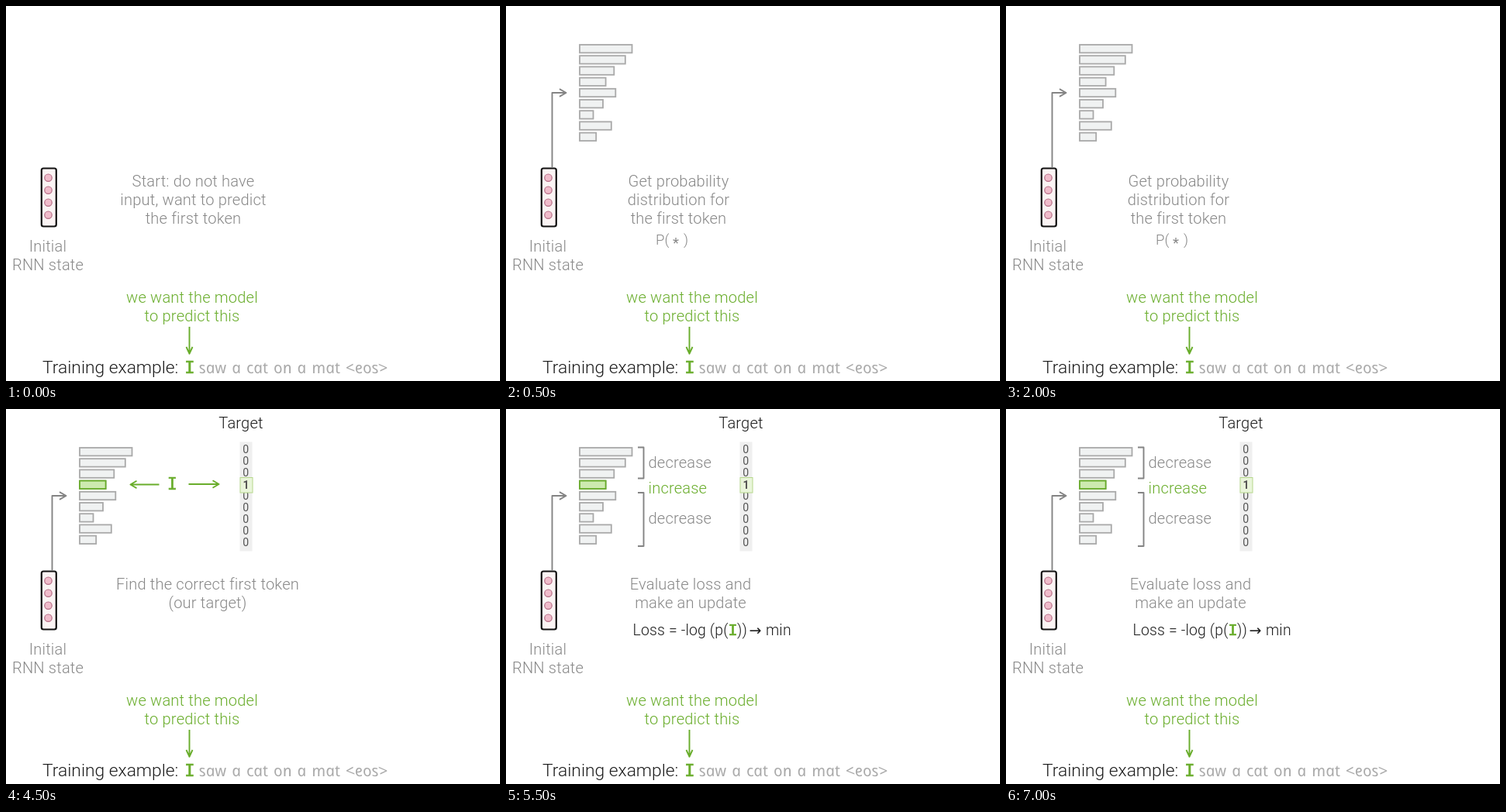
Animation of 637 by 484 pixels, one loop 8000 ms. Source, as an HTML page:

```html
<!DOCTYPE html>
<html lang="en">
<head>
<meta charset="utf-8">
<title>Training on the first token</title>
<style>
  html, body { margin: 0; width: 100%; height: 100%; overflow: hidden; background: #fff; }
  svg { display: block; width: 100vw; height: 100vh; }
  text { font: 300 20.1px Roboto, sans-serif; letter-spacing: .18px; fill: #888; }
  path { fill: none; stroke: #848484; stroke-width: 1.9; stroke-linejoin: round; }
  .mid { text-anchor: middle; }
  .dark { fill: #1c1c1c; }
  text.green { fill: #69ad2b; }
  path.green { stroke: #69ad2b; }
  .token { font: 400 22px "DejaVu Sans Mono", monospace; letter-spacing: 0; fill: #69ad2b; stroke: #69ad2b; stroke-width: .7; text-anchor: middle; }
  .rest { font: italic 500 20.3px "Noto Sans", sans-serif; fill: #aaa; letter-spacing: .2px; word-spacing: 1.5px; }
  .heading { font-size: 22.8px; letter-spacing: 0; }
  .loss { font-size: 19.4px; }
  .digit { font-size: 14px; font-weight: 400; letter-spacing: 0; fill: #555; text-anchor: middle; }
  .bar { fill: #f0f2f2; stroke: #a9a9a9; stroke-width: 1.8; }
  .bar.hit { fill: #cdeab0; stroke: #69ad2b; }
</style>
</head>
<body>
<svg viewBox="0 0 637 484">
  <rect x="45.8" y="209.5" width="19" height="75" rx="2.5" fill="#fbf4f4" stroke="#111" stroke-width="2.2"/>
  <g id="state" fill="#f0bccb" stroke="#b76f87" stroke-width="1.2"></g>
  <text class="mid" x="54" y="317">Initial</text>
  <text class="mid" x="54" y="341">RNN state</text>

  <text class="mid green" x="240" y="383">we want the model</text>
  <text class="mid green" x="240" y="407">to predict this</text>
  <path class="green" d="M236.5 414V448M232.5 440L236.5 448.8L240.5 440"/>
  <text class="dark heading" x="47" y="474">Training example:</text>
  <text class="token" x="236.8" y="474">I</text>
  <!-- the skew sets the italic letter forms upright -->
  <text class="rest" transform="translate(250 474) skewX(12)">saw a cat on a mat &lt;eos&gt;</text>

  <g data-from="0" data-to="500">
    <text class="mid" x="241.5" y="233">Start: do not have</text>
    <text class="mid" x="241.5" y="257">input, want to predict</text>
    <text class="mid" x="241.5" y="281">the first token</text>
  </g>

  <g data-from="500" data-to="8000">
    <g id="bars"></g>
    <path d="M59.5 209V112H77M69 107.2L77.5 112L69 116.8"/>
  </g>

  <g data-from="500" data-to="3000">
    <text class="mid" x="222.5" y="233">Get probability</text>
    <text class="mid" x="222.5" y="257">distribution for</text>
    <text class="mid" x="222.5" y="281">the first token</text>
    <text y="308" style="font-size:18.5px"><tspan x="193">P(</tspan><tspan x="215" dy="4" font-weight="400">*</tspan><tspan x="229" dy="-4">)</tspan></text>
  </g>

  <g data-from="3000" data-to="8000">
    <rect class="bar hit" x="95" y="92.6" width="33.6" height="10.4"/>
    <text class="mid dark" x="303" y="24.5">Target</text>
    <rect x="301.5" y="42.5" width="16" height="141" fill="#efefef"/>
    <g id="digits"></g>
    <rect x="302" y="88.5" width="16" height="19.5" fill="#e9f5da" stroke="#b6d78c"/>
    <text class="digit dark" x="309.5" y="103" style="font-weight:700">1</text>
  </g>

  <g data-from="3000" data-to="5500">
    <path class="green" d="M197.5 97.5H161M168.5 92.8L160.5 97.5L168.5 102.2M235.5 97H274M266.5 92.3L274.5 97L266.5 101.7"/>
    <text class="token" x="214.3" y="103.5" style="font-size:21px">I</text>
    <text class="mid" x="260" y="233">Find the correct first token</text>
    <text class="mid" x="260" y="257">(our target)</text>
  </g>

  <g data-from="5500" data-to="8000">
    <path d="M170 49.5H177.5V89.5H170M170 108H177.5V177H170"/>
    <text x="183.5" y="76">decrease</text>
    <text class="green" x="183.5" y="108.5">increase</text>
    <text x="183.5" y="148">decrease</text>
    <text class="mid" x="238" y="233">Evaluate loss and</text>
    <text class="mid" x="238" y="257">make an update</text>
    <text class="dark loss" x="163.5" y="292">Loss = -log (p(</text>
    <text class="token" x="292.5" y="292" style="font-size:20px">I</text>
    <text class="dark loss" x="298" y="292">))</text>
    <text class="dark" x="313.5" y="292" style="font:400 19px 'DejaVu Sans',sans-serif">→</text>
    <text class="dark loss" x="335" y="292">min</text>
  </g>
</svg>
<script>
const $ = id => document.getElementById(id);
const barWidths = [67.5, 58.8, 44.3, 33.6, 46.3, 30, 17.5, 40.8, 21.2];

$("state").innerHTML = [0, 1, 2, 3].map(i =>
  `<circle cx="54.5" cy="${221.7 + 16 * i}" r="4.7"/>`).join("");
$("bars").innerHTML = barWidths.map((w, i) =>
  `<rect class="bar" x="95" y="${50 + 14.2 * i}" width="${w}" height="10.4"/>`).join("");
$("digits").innerHTML = barWidths.map((w, i) =>
  i === 3 ? "" : `<text class="digit" x="309.3" y="${57.3 + 15 * i}">0</text>`).join("");

const LOOP = 8000;
const scenes = document.querySelectorAll("[data-from]");
const start = performance.now();

function draw(now) {
  const t = Math.max(0, now - start) % LOOP;
  for (const { style, dataset } of scenes) {
    style.display = t >= +dataset.from && t < +dataset.to ? "" : "none";
  }
  requestAnimationFrame(draw);
}
draw(start);
</script>
</body>
</html>
```
